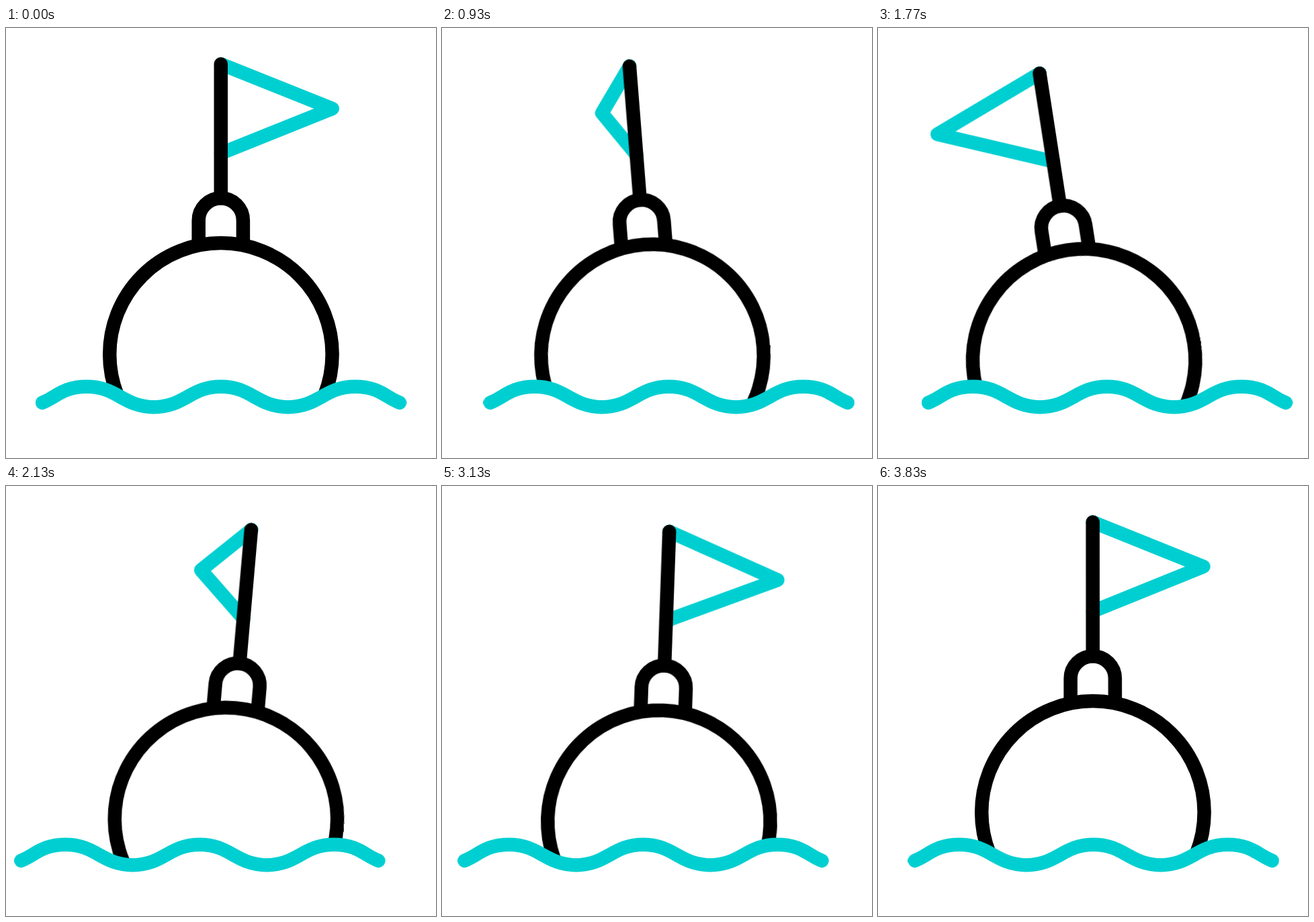
Recreate the animation shown at these times as an HTML page. Size 640 by 640 pixels, loop 3.87 s.

```html
<!DOCTYPE html>
<html lang="en">
<head>
<meta charset="utf-8">
<title>Buoy</title>
<style>
  html, body { margin: 0; width: 100%; height: 100%; overflow: hidden; background: #fff; }
  svg { display: block; width: 100vw; height: 100vh; }
  path, circle {
    fill: none; stroke: #000; stroke-width: 20.5;
    stroke-linecap: round; stroke-linejoin: round;
  }
  .teal { stroke: #00cfd1; }
  .water { fill: #fff; stroke: none; }

  .sway, .bob, .tilt, .flag {
    animation: 3870ms cubic-bezier(.37, 0, .63, 1) infinite;
  }
  .sway { animation-name: sway; }
  .bob  { animation-name: bob; }
  .tilt { animation-name: tilt; transform-origin: 320px 572px; }
  .flag { animation-name: flip; transform-origin: 320px 120px; vector-effect: non-scaling-stroke; }

  @keyframes sway {
    0% { transform: translateX(-.4px); }
    10.345%, 32.759%, 55.172%, 77.586% { transform: translateX(-32px); }
    21.552%, 43.966%, 66.379%, 88.793% { transform: translateX(24px); }
    100% { transform: translateX(0); }
  }
  @keyframes bob {
    0%, 26.29%, 50%, 75%, 98.28%, 100% { transform: translateY(0); }
    12.07%, 38.19%, 62.5%, 86.64% { transform: translateY(27px); }
  }
  @keyframes tilt {
    0%, 100% { transform: rotate(0deg); }
    10.345% { transform: rotate(9deg); }
    21.552% { transform: rotate(-6.3deg); }
    32.759% { transform: rotate(9deg); }
    43.966% { transform: rotate(-9.7deg); }
    55.172% { transform: rotate(5deg); }
    66.379% { transform: rotate(-2.7deg); }
    77.586% { transform: rotate(2.8deg); }
    88.793% { transform: rotate(-1deg); }
  }
  @keyframes flip {
    0%, 11.55% { transform: scaleX(1); }
    32.76%, 44.66% { transform: scaleX(-1); }
    73.28% { transform: scaleX(1); }
    81.03% { transform: scaleX(.987); }
    100% { transform: scaleX(.993); }
  }
</style>
</head>
<body>
<svg viewBox="0 0 640 640">
  <g class="bob">
    <g class="tilt">
      <path class="flag teal" d="M320 53.7 L485.7 120 L320 186.5"/>
      <path d="M319.8 53.7 V253.3"/>
      <path d="M286.7 320 V286.4 a33.1 33.1 0 0 1 66.2 0 V320"/>
      <circle cx="319.9" cy="485.8" r="165.7" style="fill:#fff"/>
    </g>
  </g>
  <g class="sway">
    <!-- white water hides the submerged part of the ball -->
    <path class="water" d="M54.3 557.6 C74.3 550 85.3 533.7 120.7 533.7
      C165.7 533.7 175.5 564.2 220.5 564.2 S275.3 533.7 320.3 533.7
      S375.1 564.2 420.1 564.2 S474.9 533.7 519.9 533.7
      C555.3 533.7 566.3 550 586.3 557.6 V720 H54.3 Z"/>
    <path class="teal" d="M54.3 557.6 C74.3 550 85.3 533.7 120.7 533.7
      C165.7 533.7 175.5 564.2 220.5 564.2 S275.3 533.7 320.3 533.7
      S375.1 564.2 420.1 564.2 S474.9 533.7 519.9 533.7
      C555.3 533.7 566.3 550 586.3 557.6"/>
  </g>
</svg>
</body>
</html>
```
